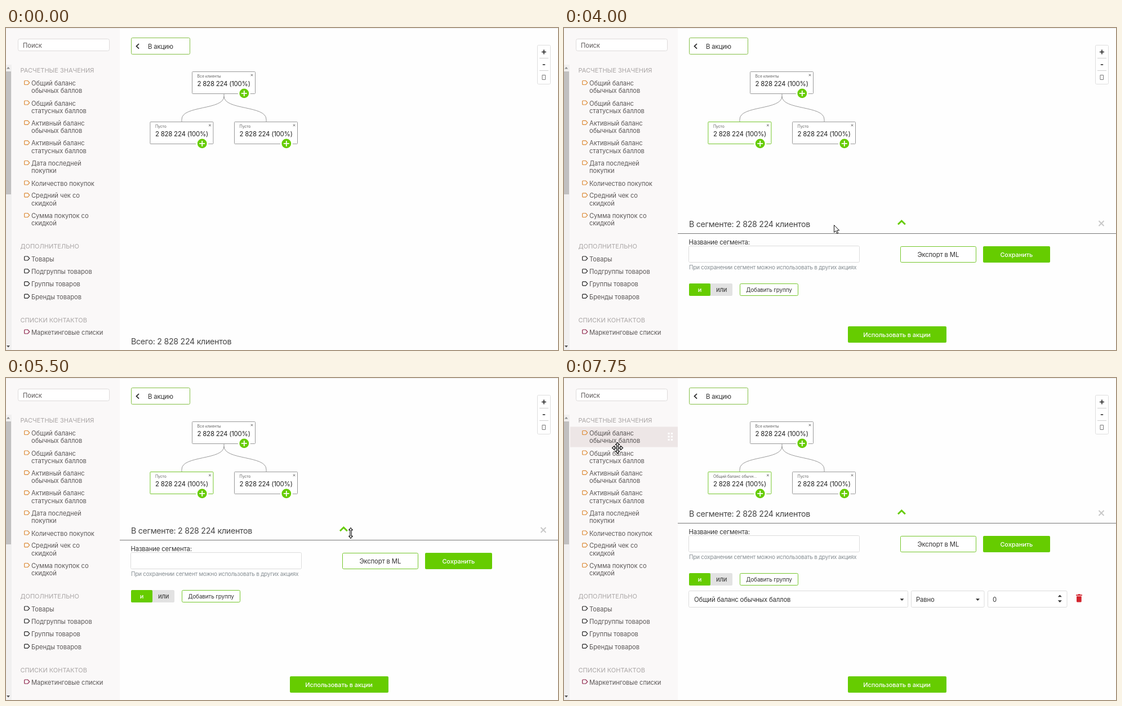
Recreate the animation shown at these times as an HTML page. Size 980 by 571 pixels, loop 8 s.

```html
<!DOCTYPE html>
<html lang="ru">
<head>
<meta charset="utf-8">
<title>Сегменты</title>
<style>
html, body { margin: 0; width: 100%; height: 100%; overflow: hidden; background: #fefefe; }
svg { display: block; position: absolute; left: 0; top: 0; }
text { font-family: Inter, "Open Sans", sans-serif; font-size: 11.3px; letter-spacing: -.15px; fill: #333; }
.side { font-size: 11.2px; letter-spacing: -.05px; fill: #5c5858; }
.head { font-size: 11px; letter-spacing: 0; fill: #a9a5a5; }
.num { font-size: 11.5px; letter-spacing: -.25px; fill: #222; }
.tiny { font-size: 7px; letter-spacing: -.1px; fill: #666; }
.big { font-size: 14.2px; letter-spacing: -.27px; fill: #444; }
.hint { font-size: 10px; letter-spacing: -.25px; fill: #868e93; }
.small { font-size: 10px; letter-spacing: -.15px; }
.white { font-size: 11px; letter-spacing: -.1px; font-weight: 500; fill: #fff; }
.mid { text-anchor: middle; }
</style>
</head>
<body>
<svg id="stage" width="980" height="571" viewBox="0 0 980 571" xmlns="http://www.w3.org/2000/svg"></svg>
<script>
const GREEN = '#66cc00', EDGE = '#74c62a', LOOP = 8000;

const rect = (x, y, w, h, fill = '#fff', stroke = 'none', r = 0) =>
  `<rect x="${x}" y="${y}" width="${w}" height="${h}" rx="${r}" fill="${fill}" stroke="${stroke}"/>`;
const text = (x, y, str, cls = '') => `<text x="${x}" y="${y}" class="${cls}">${str}</text>`;
const line = (d, stroke, w = 1) => `<path d="${d}" fill="none" stroke="${stroke}" stroke-width="${w}"/>`;
const fill = (d, color) => `<path d="${d}" fill="${color}"/>`;
const cross = (x, y, r, color, w) =>
  line(`M${x - r} ${y - r}l${2 * r} ${2 * r}M${x + r} ${y - r}l${-2 * r} ${2 * r}`, color, w);
const group = (id, body) => `<g id="${id}">${body}</g>`;

// Sidebar
const tag = (y, color) =>
  line(`M33.7 ${y - 3.5}h5l3 3.5l-3 3.5h-5q-1 0-1-1v-5q0-1 1-1z`, color, 1.2);
const item = (y, color, first, second = '') =>
  tag(y - 1, color) + text(45, y + 4, first, 'side') + (second && text(45, y + 17.4, second, 'side'));

const AMBER = '#dc8a35', DARK = '#222', WINE = '#8c2148';
const items = [
  [98, AMBER, 'Общий баланс', 'обычных баллов'],
  [133.5, AMBER, 'Общий баланс', 'статусных баллов'],
  [168.8, AMBER, 'Активный баланс', 'обычных баллов'],
  [204.3, AMBER, 'Активный баланс', 'статусных баллов'],
  [240, AMBER, 'Дата последней', 'покупки'],
  [275.5, AMBER, 'Количество покупок'],
  [297.3, AMBER, 'Средний чек со', 'скидкой'],
  [333, AMBER, 'Сумма покупок со', 'скидкой'],
  [409.5, DARK, 'Товары'],
  [432, DARK, 'Подгруппы товаров'],
  [454.3, DARK, 'Группы товаров'],
  [476.7, DARK, 'Бренды товаров'],
  [539.5, WINE, 'Маркетинговые списки']
];

let grip = '';
for (const x of [184.5, 190])
  for (const y of [10.5, 16, 21.5]) grip += rect(x, y, 3, 3);

const sidebar =
  rect(0, 0, 202, 571, '#faf8f8') +
  rect(0, 65, 10, 506, '#f1f0f0') + rect(0, 77, 9, 218, '#c1c0c0') +
  fill('M1 72.5l3-3.5l3 3.5z', '#8a8a8a') + fill('M1 563l3 3.5l3-3.5z', '#505050') +
  rect(21.5, 19.5, 162, 21, '#fff', '#dddada', 3) + text(30, 35, 'Поиск', 'side') +
  group('hover', rect(11, 0, 191, 36, '#ede6e6') + grip) +
  text(25.5, 79, 'РАСЧЕТНЫЕ ЗНАЧЕНИЯ', 'head') +
  text(25.5, 391, 'ДОПОЛНИТЕЛЬНО', 'head') +
  text(25.5, 521.5, 'СПИСКИ КОНТАКТОВ', 'head') +
  items.map(i => item(...i)).join('');

// Segment tree
const plus = (x, y) =>
  `<circle cx="${x}" cy="${y}" r="11" fill="#fff"/><circle cx="${x}" cy="${y}" r="8.4" fill="${GREEN}"/>` +
  line(`M${x - 5} ${y}h10M${x} ${y - 5}v10`, '#fff', 1.8);
const card = (x, y, name, id) =>
  `<rect id="${id}" x="${x}" y="${y}" width="112" height="39" rx="1" fill="#fff" stroke="#999"/>` +
  `<text id="${id}Name" x="${x + 9}" y="${y + 10.4}" class="tiny">${name}</text>` +
  text(x + 9, y + 25.5, '2 828 224 (100%)', 'num') +
  cross(x + 106, y + 6, 1.7, '#444', .9) + plus(x + 92.3, y + 38.4);

const tree =
  line('M387 117v4C387 146 312 137 312 162v4M387 121C387 146 462 137 462 162v4', '#999') +
  card(330.5, 77.5, 'Все клиенты', 'root') +
  card(255.9, 166.5, 'Пусто', 'left') +
  card(405.5, 166.5, 'Пусто', 'right');

const chrome =
  rect(222.5, 17.5, 104, 29, '#fff', '#84bf45', 2) +
  line('M236 28l-4.5 4.3l4.5 4.3', '#222', 1.7) +
  text(252, 36.8, 'В акцию') +
  rect(943.5, 30.5, 23, 69, '#fff', '#dedede', 2) +
  line('M947 53.5h16M947 75.5h16', '#cfcfcf') +
  line('M951 42.5h8M955 38.5v8M952.8 65h4.4', '#222', 1.6) +
  line('M952 83.5h5.5v8h-5.5z', '#777') +
  text(222, 561, 'Всего: 2 828 224 клиентов', 'big');

// Segment editor
const field = (x, w, y = 484.5) => rect(x, y, w, 29, '#fff', '#dcdcdc', 2);
const caret = (x, y, s = 1) => fill(`M${x - 3.5} ${y - 1.8 * s}h7l-3.5 ${3.8 * s}z`, '#333');

const rule =
  field(221.5, 389) + text(231, 504, 'Общий баланс обычных баллов') + caret(600, 500) +
  field(616.5, 129.5) + text(625, 504, 'Равно') + caret(734.5, 500) +
  field(752.5, 140.5) + text(761, 503.5, '0') + caret(880.3, 493.5, -1) + caret(880.3, 503) +
  fill('M910 494h8.7v9q0 1.5-1.5 1.5h-5.7q-1.5 0-1.5-1.5zM909 491.3h3l1-1h3l1 1h3v1.6h-11z', '#d3252e');

const editor =
  rect(202, 335, 778, 350, '#fefefe') +
  text(222, 353, 'В сегменте: 2 828 224 клиентов', 'big') +
  line('M593 348.3l6.4-6.3l6.4 6.3', GREEN, 3) +
  cross(954, 346.5, 4.5, '#c8c8c8', 2) +
  line('M202 364.5h778', '#777') +
  text(221.5, 383.6, 'Название сегмента:') + field(221.5, 303, 386.5) +
  text(222, 428.2, 'При сохранении сегмент можно использовать в других акциях', 'hint') +
  rect(597.5, 387.5, 134, 28, '#fff', EDGE, 2) + text(664.3, 405.7, 'Экспорт в ML', 'mid') +
  rect(744, 387, 119, 29, GREEN, 'none', 2) + text(803.3, 405.7, 'Сохранить', 'white mid') +
  rect(222, 453, 77, 22, '#e2e2e2', 'none', 2) + rect(222, 453, 38, 22, GREEN, 'none', 2) +
  text(241, 468, 'и', 'white mid') + text(279.7, 468, 'или', 'mid') +
  rect(312.5, 453.5, 103, 21, '#fff', EDGE, 2) + text(364, 467.5, 'Добавить группу', 'small mid') +
  group('rule', rule);

const useButton =
  rect(504, 529, 175, 29, GREEN, 'none', 2) + text(591, 548, 'Использовать в акции', 'white mid');

// Pointers, each drawn around its own anchor
const outline = (d, w = 1) =>
  `<path d="${d}" fill="#fff" stroke="#111" stroke-width="${w}" stroke-linejoin="round"/>`;
const quarter = 'M-1.2-1.2V-5.5H-3.6L0-9.6L3.6-5.5H1.2V-1.2z';
const pointers = {
  arrow: outline('M.5.5V13.5L3.5 10.7L5.6 15.4L7.7 14.5L5.6 9.9H9.7z'),
  hand: outline('M4.5 12.5V2Q4.5.5 5.8.5T7.2 2V7.5Q8.4 6.6 9.5 8Q10.8 7.2 11.7 8.6Q13.5 8 13.5 10V14.5Q13.5 17 12 18.2V20H5.5V18.5Q3.5 16.5.8 12.2Q.2 10.6 1.8 10.4Q3.2 10.8 4.5 12.5z', 1.2),
  resize: outline('M0-9.3L3.4-5.4H1.2V5.4H3.4L0 9.3L-3.4 5.4H-1.2V-5.4H-3.4z', 1.1),
  move: [0, 90, 180, 270].map(a => `<g transform="rotate(${a})">${outline(quarter, 1.2)}</g>`).join('') +
    rect(-1.2, -1.2, 2.4, 2.4)
};

const stage = document.getElementById('stage');
stage.innerHTML =
  rect(0, 0, 980, 571, '#fefefe') + chrome + tree +
  group('panel', group('editor', editor) + useButton) +
  sidebar + line('M0 .5h980', '#ececec') +
  Object.keys(pointers).map(k => group(k, pointers[k])).join('');

const $ = id => document.getElementById(id);
const show = (id, on) => $(id).setAttribute('display', on ? 'inline' : 'none');
const place = (id, x, y) => $(id).setAttribute('transform', `translate(${x} ${y})`);

// Step tables: time first, then the values held from that time on
const pointerSteps = [
  [0, ''],
  [500, 'arrow', 320, 349], [750, 'arrow', 303, 261], [1000, 'arrow', 302, 212],
  [1250, 'hand', 306, 185], [1500, 'hand', 319, 191], [1750, 'hand', 306, 183],
  [4000, 'arrow', 479, 349], [4250, 'arrow', 565, 356],
  [4500, 'resize', 594, 361], [4750, 'resize', 599, 357], [5000, 'resize', 604, 356],
  [5250, 'resize', 607, 301.5], [5500, 'resize', 612, 275], [5750, 'resize', 617.5, 250],
  [6250, 'resize', 605, 255], [6500, 'move', 100, 178],
  [6750, 'move', 96, 115.5], [7750, 'move', 95, 124]
];
const panelSteps = [[0, 0], [5250, -50], [5500, -77], [5750, -107]];
const hoverSteps = [[0, -1], [6500, 157], [6750, 86.5]];
const at = (steps, t) => steps.filter(s => s[0] <= t).pop();

function draw(t) {
  const [, kind, x, y] = at(pointerSteps, t);
  for (const k in pointers) show(k, k === kind);
  if (kind) place(kind, x, y);

  const open = t >= 2500, added = t >= 7500;
  show('panel', open);
  show('rule', added);
  place('editor', 0, at(panelSteps, t)[1]);
  $('left').setAttribute('stroke', open ? EDGE : '#999');
  $('leftName').textContent = added ? 'Общий баланс обычн...' : 'Пусто';

  const hover = at(hoverSteps, t)[1];
  show('hover', hover >= 0);
  place('hover', 0, hover);
}

const start = performance.now();
function tick() {
  draw((performance.now() - start) % LOOP);
  requestAnimationFrame(tick);
}
tick();
</script>
</body>
</html>
```
